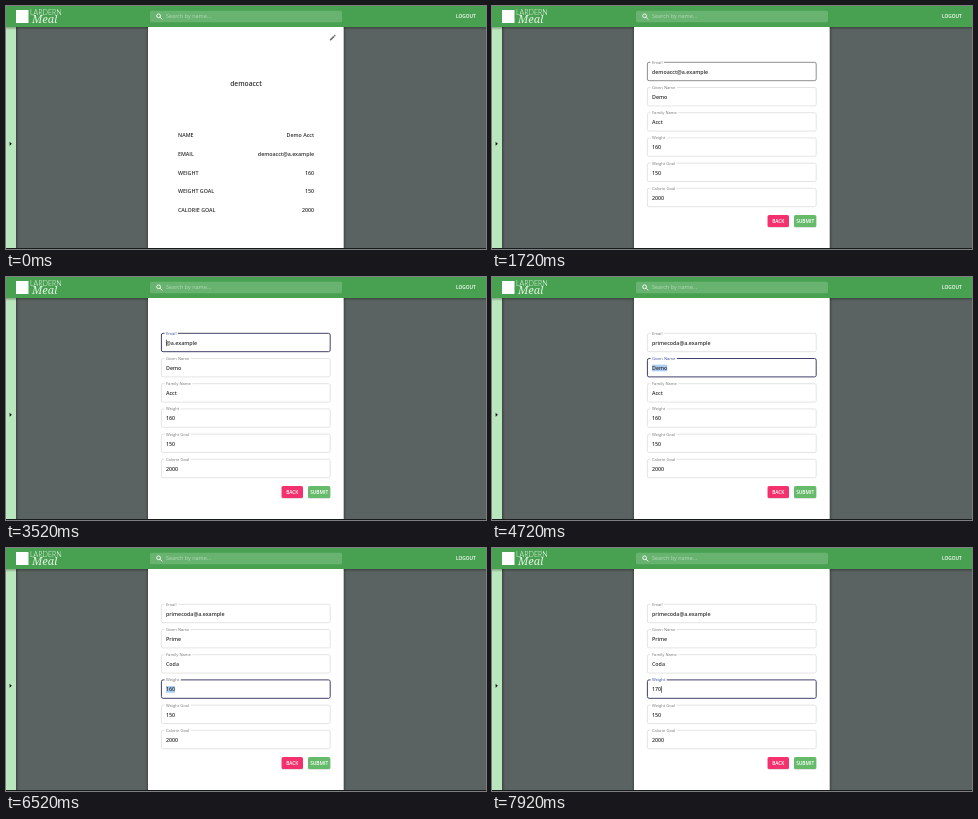
Animation, 480 px wide and 243 px high, one loop 8000 ms. Source, as an HTML page:

```html
<!DOCTYPE html>
<html lang="en">
<head>
<meta charset="utf-8">
<title>Profile form</title>
<style>
  html, body { margin: 0; width: 100%; height: 100%; overflow: hidden; background: #5a6361; }
  svg { display: block; width: 100vw; height: 100vh; }
  text { font: 600 5.3px "Open Sans", "Noto Sans", sans-serif; fill: #303030; white-space: pre; }
  .title { font-size: 6.7px; text-anchor: middle; }
  .right { text-anchor: end; }
  .white { fill: #fff; }
  .label { font-size: 4.1px; font-weight: 400; }
  .button { font-size: 4.8px; fill: #fff; text-anchor: middle; }
  .item { font-size: 4.8px; fill: #f4f4f4; }
  .brand { font: 300 7.1px Lato, sans-serif; fill: #fff; }
  .script { font: italic 400 11px "Noto Serif", serif; fill: #e4f4e4; }
</style>
</head>
<body>
<svg viewBox="0 0 480 243" preserveAspectRatio="none">
  <defs>
    <linearGradient id="down" x2="0" y2="1">
      <stop stop-color="#000" stop-opacity=".3"/><stop offset="1" stop-opacity="0"/>
    </linearGradient>
    <linearGradient id="side">
      <stop stop-color="#000" stop-opacity=".3"/><stop offset="1" stop-opacity="0"/>
    </linearGradient>
    <filter id="soft" x="-10%" y="-10%" width="120%" height="120%"><feGaussianBlur stdDeviation="1.3"/></filter>
  </defs>

  <rect width="480" height="243" fill="#5a6361"/>
  <rect x="141.5" y="18" width="197" height="228" fill="#000" opacity=".4" filter="url(#soft)"/>
  <rect x="142" y="20" width="195.7" height="222" fill="#fff"/>
  <g id="page"></g>

  <rect x="10" y="20" width="3" height="222" fill="url(#side)"/>
  <rect y="20" width="10" height="222" fill="#b9e6bc"/>
  <path d="M3.6 135.8l2.2 2-2.2 2z" fill="#111"/>
  <rect y="21" width="142" height="3" fill="url(#down)"/>
  <rect x="337.7" y="21" width="142.3" height="3" fill="url(#down)"/>
  <rect y="242" width="480" height="1" fill="#171b19"/>

  <rect width="480" height="21" fill="#47a150"/>
  <rect x="10" y="4" width="12.5" height="13" fill="#fff"/>
  <text class="brand" x="24" y="9.4">LARDERN</text>
  <text class="script" x="26" y="17.3">Meal</text>
  <rect x="144" y="4.7" width="192" height="11.5" rx="1.5" fill="#69b370"/>
  <g fill="none" stroke="#fff" stroke-width=".9"><circle cx="152.6" cy="9.8" r="1.9"/><path d="M154 11.2l2.2 2.2"/></g>
  <text x="160" y="12.4" style="font-weight:400;font-size:5.5px;fill:#b5dab8">Search by name...</text>
  <text class="white" x="450" y="12.1" style="font-size:4.8px">LOGOUT</text>
</svg>

<script>
const LOOP = 8000, FIELD_X = 160, PITCH = 25.2;
const LABELS = ["Email", "Given Name", "Family Name", "Weight", "Weight Goal", "Calorie Goal"];
const OLD_NAME = "demoacct", NEW_NAME = "primecoda", DOMAIN = "@a.example";
const WEIGHTS = ["135", "155", "165", "107", "150", "160"];
const WORDS = ["Prime", "Pasta", "Pepper", "Pear", "Plum", "Peas", "Potato", "Parsley", "Pumpkin"];

const page = document.getElementById("page");
const pen = document.createElement("canvas").getContext("2d");

function textWidth(str, size, weight) {
  pen.font = `${weight} ${size}px "Open Sans", "Noto Sans", sans-serif`;
  return pen.measureText(str).width;
}

const rect = (x, y, w, h, style) => `<rect x="${x}" y="${y}" width="${w}" height="${h}" ${style}/>`;
const text = (x, y, str, cls = "", style = "") => `<text x="${x}" y="${y}" class="${cls}" style="${style}">${str}</text>`;

// Each entry merges its changes into the state at its time.
const timeline = [];
const at = (time, change) => timeline.push([time, change]);
const setValue = (time, row, value, more = {}) =>
  at(time, { row, value, caret: value.length, selected: false, ...more });
const focus = (time, row, more = {}) =>
  at(time, { focus: row, focusTime: time, hover: -1, selected: true, items: [], ...more });

at(920, { iconHover: true });
at(1120, { form: true });
at(1440, { hover: 0 });
at(1480, { hover: 1 });
at(1720, { hover: 0 });
focus(2720, 0, { selected: false, caret: OLD_NAME.length });
[7, 5, 3, 1, 0].forEach((n, i) =>
  setValue(3160 + i * 90, 0, OLD_NAME.slice(0, n) + DOMAIN, { caret: n }));
[2, 4, 6, 8, 9].forEach((n, i) =>
  setValue(3880 + i * 80, 0, NEW_NAME.slice(0, n) + DOMAIN, { caret: n }));
focus(4320, 1);
setValue(4760, 1, "P");
at(4800, { items: WORDS });
setValue(4920, 1, "Pr", { items: ["Prime"] });
setValue(5040, 1, "Pri");
setValue(5120, 1, "Prim");
setValue(5240, 1, "Prime", { items: [] });
focus(5440, 2);
setValue(5840, 2, "C");
at(5880, { items: ["Coda"] });
setValue(6080, 2, "Co");
setValue(6120, 2, "Cod");
setValue(6280, 2, "Coda", { items: [] });
focus(6520, 3);
setValue(7360, 3, "1");
at(7400, { items: WEIGHTS });
setValue(7800, 3, "17");
at(7840, { items: [] });
setValue(7920, 3, "170");

function stateAt(time) {
  const state = {
    values: [OLD_NAME + DOMAIN, "Demo", "Acct", "160", "150", "2000"],
    focus: -1, hover: -1, items: []
  };
  for (const [start, change] of timeline) {
    if (start > time) break;
    Object.assign(state, change);
    if ("value" in change) state.values[change.row] = change.value;
  }
  return state;
}

function drawProfile(state) {
  const rows = [["NAME", "Demo Acct"], ["EMAIL", OLD_NAME + DOMAIN], ["WEIGHT", "160"],
    ["WEIGHT GOAL", "150"], ["CALORIE GOAL", "2000"]];
  const pencil = `<path transform="translate(322.9 27.8) scale(.32)" fill="${state.iconHover ? "#5c5c5c" : "#757575"}"
    d="M3 17.25V21h3.75L17.81 9.94l-3.75-3.75zM20.71 7.04a1 1 0 0 0 0-1.41l-2.34-2.34a1 1 0 0 0-1.41 0l-1.83 1.83 3.75 3.75z"/>`;
  return pencil + text(240, 79.7, OLD_NAME, "title") + rows.map(([name, value], i) => {
    const y = 130.9 + i * 18.85;
    return text(172, y, name) + text(308, y, value, "right");
  }).join("");
}

function drawField(state, row, fade) {
  const y = 56.3 + row * PITCH, base = y + 11.5;
  const focused = state.focus === row, value = state.values[row];
  const [stroke, width] = focused ? ["#40406c", 1] : state.hover === row ? ["#333", .55] : ["#d2d2d2", .6];
  const labelColor = focused ? `color-mix(in srgb, #3f51a5 ${fade * 100}%, #777)` : "#777";
  let out = rect(155.4, y, 168.8, 18.4, `rx="1.7" fill="none" stroke="${stroke}" stroke-width="${width}"`)
    + rect(158.5, y - 1, textWidth(LABELS[row], 4.1, 400) + 3, 2, 'fill="#fff"');
  if (focused && state.selected)
    out += rect(FIELD_X, base - 5.3, textWidth(value, 5.3, 600), 6.6, 'fill="#a9cdf4"');
  out += text(FIELD_X, y + 1.5, LABELS[row], "label", `fill:${labelColor}`) + text(FIELD_X, base, value);
  if (focused && !state.selected) {
    const x = FIELD_X + textWidth(value.slice(0, state.caret), 5.3, 600);
    out += rect(x, base - 5.2, .6, 6.6, 'fill="#222"');
  }
  return out;
}

function drawButton(x, w, color, name) {
  return rect(x, 209.8, w, 12, 'rx="1.6" fill="#000" opacity=".15"')
    + rect(x, 209, w, 12, `rx="1.6" fill="${color}"`)
    + text(x + w / 2, 216.8, name, "button");
}

function drawItems(state) {
  if (!state.items.length) return "";
  const top = 75.3 + state.focus * PITCH;
  return rect(155, top, 64, state.items.length * 12 + 5, 'rx="1" fill="#38393b"')
    + state.items.map((name, i) => text(159, top + 10.2 + i * 12, name, "item")).join("");
}

function drawForm(state, fade) {
  return LABELS.map((_, row) => drawField(state, row, fade)).join("")
    + drawButton(275.6, 21.4, "#f4316d", "BACK")
    + drawButton(302, 22.3, "#66bb6a", "SUBMIT")
    + drawItems(state);
}

let shown = "";
function render() {
  const time = performance.now() % LOOP;
  const state = stateAt(time);
  const fade = Math.min(1, (time - (state.focusTime || 0)) / 120);
  const markup = state.form ? drawForm(state, fade) : drawProfile(state);
  if (markup !== shown) page.innerHTML = shown = markup;
  requestAnimationFrame(render);
}
render();
</script>
</body>
</html>
```
